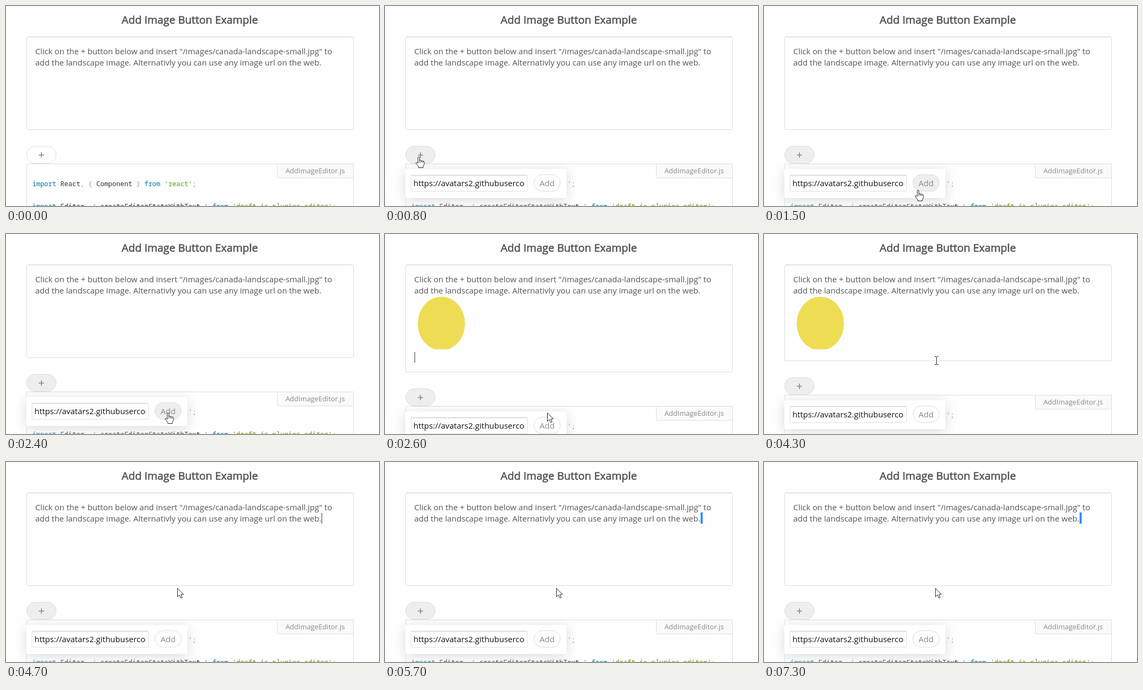
Recreate the animation shown at these times as an HTML page. Size 695x373 px, loop 8000 ms.

```html
<!DOCTYPE html>
<html lang="en">
<head>
<meta charset="utf-8">
<title>Add Image Button Example</title>
<style>
  html, body { margin: 0; width: 100%; height: 100%; overflow: hidden; background: #fefefe; }
  svg { display: block; width: 695px; height: 373px; }
  text { font: 15px "Open Sans", sans-serif; fill: #555; white-space: pre; }
  .title { font-size: 20px; stroke: #555; stroke-width: .65px; }
  .muted { fill: #888; }
  .code { font: 12.43px "Noto Sans Mono", monospace; fill: #333; }
  .key { fill: #07a; }
  .str { fill: #690; }
  .punc { fill: #999; }
  .box { stroke: #ddd; }
</style>
</head>
<body>
<svg viewBox="0 0 695 373">
  <defs>
    <filter id="soft" x="-20%" y="-100%" width="140%" height="300%"><feGaussianBlur stdDeviation="11"/></filter>
    <clipPath id="inputClip"><rect x="53" y="316" width="208" height="29"/></clipPath>
    <clipPath id="imageClip"><rect x="55" y="116" width="100" height="99"/></clipPath>
  </defs>
  <rect width="695" height="373" fill="#fefefe"/>
  <text class="title" x="342.5" y="33" text-anchor="middle">Add Image Button Example</text>

  <rect id="editor" class="box" x="38.5" y="57.5" width="609" height="173" rx="2" fill="#fefefe"/>
  <path d="M40 57.5H646" stroke="#d2d2d2"/>
  <path d="M40 58.5H646" stroke="#f3f3f3"/>
  <text x="54.5" y="90">Click on the + button below and insert "/images/canada-landscape-small.jpg" to</text>
  <text x="54.5" y="111">add the landscape image. Alternativly you can use any image url on the web.</text>
  <ellipse id="image" cx="105" cy="167" rx="44" ry="50" fill="#efdc55" clip-path="url(#imageClip)"/>
  <rect id="selection" x="588" y="94" width="4" height="21" fill="#3390ff"/>
  <rect id="caret" width="1" height="20" fill="#333"/>

  <g id="below">
    <rect class="box" x="38.5" y="294.5" width="609" height="120" rx="2" fill="#fefefe"/>
    <path class="box" d="M505.5 294.5H647.5V320.5H507.5Q505.5 320.5 505.5 318.5Z" fill="#fafafa"/>
    <text class="muted" x="576" y="312" text-anchor="middle" style="font-size:13px">AddImageEditor.js</text>
    <text class="code" x="49" y="335.5"><tspan class="key">import</tspan> React<tspan class="punc">, {</tspan> Component <tspan class="punc">}</tspan> <tspan class="key">from</tspan> <tspan class="str">'react'</tspan><tspan class="punc">;</tspan></text>
    <text class="code" x="49" y="378"><tspan class="key">import</tspan> Editor<tspan class="punc">, {</tspan> createEditorStateWithText <tspan class="punc">}</tspan> <tspan class="key">from</tspan> <tspan class="str">'draft-js-plugins-editor'</tspan><tspan class="punc">;</tspan></text>
    <rect id="plus" class="box" x="38.5" y="261.5" width="55" height="32" rx="16"/>
    <path d="M61 278H71M66 273V283" stroke="#888" stroke-width="1.6"/>
    <g id="popup">
      <rect x="38" y="308" width="300" height="54" fill="#dcdcdc" filter="url(#soft)"/>
      <rect x="38" y="304" width="300" height="54" rx="2" fill="#fff"/>
      <rect class="box" x="48.5" y="315.5" width="217" height="30" rx="2" fill="#fff"/>
      <path d="M49 315.5H265" stroke="#ccc"/>
      <path d="M49 316.5H265" stroke="#f0f0f0"/>
      <text x="53" y="336" style="fill:#111" clip-path="url(#inputClip)">https://avatars2.githubusercontent.com</text>
      <rect id="add" class="box" x="277.5" y="314.5" width="49" height="31" rx="15.5"/>
      <text class="muted" x="288" y="336">Add</text>
    </g>
  </g>

  <g id="arrow" stroke="#222" stroke-linejoin="round">
    <path d="M.5.5V16.5L4.2 13L6.8 18.7L9.3 17.6L6.8 12H11.7Z" fill="#fff"/>
  </g>
  <g id="beam" stroke="#222" fill="none">
    <path d="M-3-7.5H-1L.5-6.5L2-7.5H4M-3 7.5H-1L.5 6.5L2 7.5H4M.5-6.5V6.5"/>
  </g>
  <g id="hand" stroke="#222" stroke-linejoin="round" stroke-linecap="round">
    <path d="M-1.5 12V1.3Q0-.8 1.5 1.3V7Q3.2 5.7 4.3 7.6Q6 6.5 7.2 8.4Q9.5 7.6 10 10V14.5L8 18V20.5H-.5V18.5L-5.5 12Q-5 9.5-3 11Z" fill="#fff"/>
    <path d="M1.5 7V10.5M4.4 8V10.5M7.2 8.6V11" fill="none"/>
  </g>
</svg>
<script>
const $ = id => document.getElementById(id);
const LOOP = 8000;

// Each track holds its value from the given time until the next entry.
const pointerTrack = [
  [0], [100, "arrow", 622, 56], [200, "beam", 306, 167], [300, "arrow", 142, 243],
  [400, "arrow", 135, 250], [500, "hand", 63, 281],
  [1000, "arrow", 139, 302], [1100, "beam", 205, 328], [1200, "hand", 281, 334],
  [1300, "hand", 285, 339], [1500, "hand", 287, 343],
  [1700, "hand", 300, 342], [1800, "arrow", 338, 340], [1900, "arrow", 355, 338],
  [2000, "arrow", 340, 336], [2100, "hand", 300, 335], [2200, "beam", 251, 333],
  [2300, "hand", 288, 334], [2400, "hand", 302, 333],
  [2600, "arrow", 302, 333], [2800, "arrow", 310, 288], [2900, "beam", 321, 236],
  [4700, "arrow", 319, 235]
];
const shiftTrack = [[0, 0], [2600, 27], [4300, 6], [4700, 0]];
const caretTrack = [
  [0], [2600, 55, 220], [3100], [3600, 55, 220], [4100],
  [4700, 588, 95], [5200], [6600, 592, 95], [7100]
];

const at = (track, t) => track.findLast(entry => entry[0] <= t).slice(1);
const show = (id, on) => $(id).setAttribute("visibility", on ? "visible" : "hidden");
const move = (id, x, y) => $(id).setAttribute("transform", `translate(${x} ${y})`);

function draw(t) {
  const [shift] = at(shiftTrack, t);
  $("editor").setAttribute("height", 173 + shift);
  move("below", 0, shift);
  show("image", t >= 2600 && t < 4700);
  show("popup", t >= 800);
  show("selection", t >= 5700 && t < 6600 || t >= 7300);

  const [caretX, caretY] = at(caretTrack, t);
  show("caret", caretX);
  if (caretX) move("caret", caretX, caretY);

  const [kind, x, y] = at(pointerTrack, t);
  for (const id of ["arrow", "beam", "hand"]) show(id, id === kind);
  if (kind) move(kind, x, y);
  $("plus").setAttribute("fill", t >= 500 ? "#eee" : "#fefefe");
  $("add").setAttribute("fill", kind === "hand" && x > 270 ? "#eee" : "#fefefe");
}

const start = performance.now();
function tick() {
  draw((performance.now() - start) % LOOP);
  requestAnimationFrame(tick);
}
tick();
</script>
</body>
</html>
```
